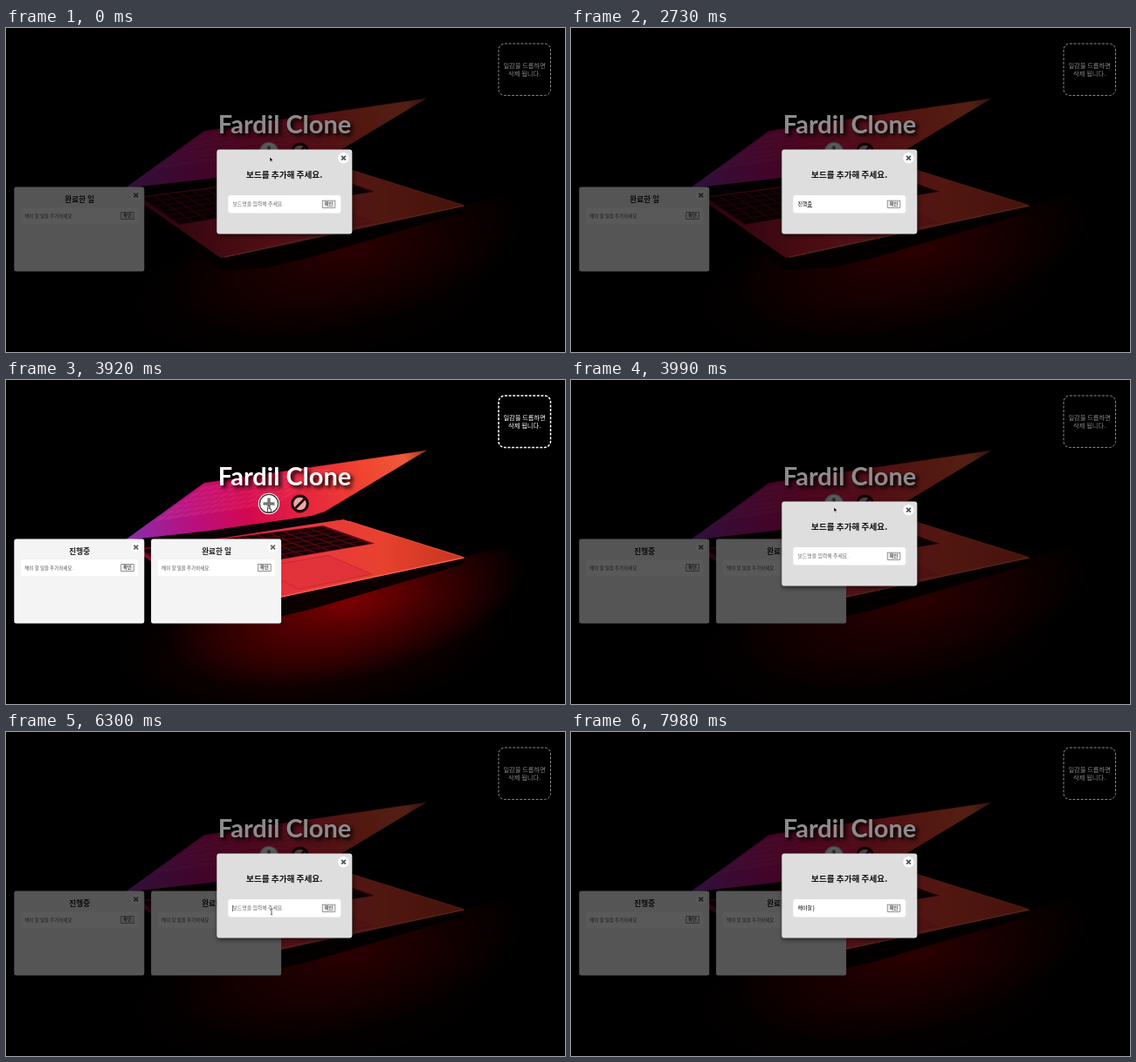
An HTML page with a canvas that plays this animation: 640 px wide and 372 px high, repeating every 8 s.

```html
<!DOCTYPE html>
<html lang="ko">
<head>
<meta charset="utf-8">
<title>Board</title>
<style>
  html, body { margin: 0; width: 100%; height: 100%; overflow: hidden; background: #000; }
  canvas { display: block; width: 640px; height: 372px; }
</style>
</head>
<body>
<canvas id="stage" width="640" height="372"></canvas>
<script>
const W = 640, H = 372, LOOP = 8000, STEP = 70;
const KR = '"Noto Sans CJK KR", "Noto Sans CJK", sans-serif';
const stage = document.getElementById('stage').getContext('2d');
let g = stage;

function poly(points, fill) {
  g.beginPath();
  points.forEach(([x, y], i) => i ? g.lineTo(x, y) : g.moveTo(x, y));
  g.closePath();
  g.fillStyle = fill;
  g.fill();
}

function box(x, y, w, h, r, fill) {
  g.beginPath();
  g.roundRect(x, y, w, h, r);
  g.fillStyle = fill;
  g.fill();
}

function disc(x, y, r, fill) {
  g.beginPath();
  g.arc(x, y, r, 0, Math.PI * 2);
  g.fillStyle = fill;
  g.fill();
}

function line(x1, y1, x2, y2, color, width) {
  g.beginPath();
  g.moveTo(x1, y1);
  g.lineTo(x2, y2);
  g.strokeStyle = color;
  g.lineWidth = width;
  g.stroke();
}

function text(s, x, y, size, color, align = 'left', weight = 400, family = KR) {
  g.font = `${weight} ${size}px ${family}`;
  g.textAlign = align;
  g.fillStyle = color;
  g.fillText(s, x, y);
}

function shadow(color, blur, dx, dy, draw) {
  g.save();
  g.shadowColor = color;
  g.shadowBlur = blur;
  g.shadowOffsetX = dx;
  g.shadowOffsetY = dy;
  draw();
  g.restore();
}

function ramp(x1, y1, x2, y2, ...stops) {
  const grad = g.createLinearGradient(x1, y1, x2, y2);
  stops.forEach(([p, c]) => grad.addColorStop(p, c));
  return grad;
}

function glow(x, y, rx, ry, angle, color, alpha) {
  g.save();
  g.translate(x, y);
  g.rotate(angle);
  g.scale(rx, ry);
  const grad = g.createRadialGradient(0, 0, 0, 0, 0, 1);
  grad.addColorStop(0, `rgba(${color},${alpha})`);
  grad.addColorStop(0.5, `rgba(${color},${alpha * 0.45})`);
  grad.addColorStop(1, `rgba(${color},0)`);
  g.fillStyle = grad;
  g.fillRect(-1, -1, 2, 2);
  g.restore();
}

// Maps unit coordinates onto a four-cornered surface.
const surface = (a, b, c, d) => (u, v) => [0, 1].map(i =>
  (a[i] * (1 - u) + b[i] * u) * (1 - v) + (d[i] * (1 - u) + c[i] * u) * v);

const patch = (at, u1, v1, u2, v2) => [at(u1, v1), at(u2, v1), at(u2, v2), at(u1, v2)];

function keys(at, u1, v1, u2, v2, fill) {
  const cols = 14, rows = 6, du = (u2 - u1) / cols, dv = (v2 - v1) / rows;
  for (let r = 0; r < rows; r++)
    for (let c = 0; c < cols; c++) {
      const u = u1 + c * du, v = v1 + r * dv;
      poly(patch(at, u, v, u + du * 0.86, v + dv * 0.84), fill);
    }
}

function paintPhoto() {
  g.fillStyle = '#000';
  g.fillRect(0, 0, W, H);
  glow(390, 258, 210, 85, -0.22, '145,0,2', 0.95);
  glow(350, 300, 230, 90, -0.1, '75,0,0', 0.5);
  // nothing is lit behind the machine
  poly([[0, 0], [W, 0], [W, 170], [526, 203], [386, 160], [140, 190], [0, 200]], '#000');

  const base = surface([140, 190], [386, 160], [526, 204], [246, 264]);
  poly([[140, 190], [246, 264], [526, 204], [522, 212], [350, 263], [300, 275], [244, 278]], '#0c0001');
  poly(patch(base, 0, 0, 1, 1),
    ramp(150, 210, 520, 200, [0, '#6e0a2c'], [0.3, '#cf1f34'], [0.5, '#ea3540'],
      [0.75, '#e8412f'], [1, '#c93620']));
  poly(patch(base, 0.02, 0.07, 0.87, 0.5), '#5a0a12');
  keys(base, 0.03, 0.08, 0.86, 0.5, '#180205');
  const pad = patch(base, 0.34, 0.56, 0.64, 0.95);
  poly(pad, '#e2323a');
  g.strokeStyle = '#b02428';
  g.lineWidth = 0.6;
  g.stroke();
  line(250, 263, 524, 204, '#f4604a', 1.6);
  line(392, 162, 522, 203, '#ee5a3c', 0.8);

  const lid = surface([227, 118], [482, 80.5], [365, 151], [136, 184]);
  poly([[136, 184], [365, 151], [386, 160], [250, 181], [150, 194]], '#0a0104');
  const face = [...patch(lid, 0, 0, 1, 1)];
  face.splice(3, 0, [350, 156], [233, 173]);
  poly(face,
    ramp(145, 180, 475, 90, [0, '#8a2ca6'], [0.2, '#b80f80'], [0.4, '#d4084f'],
      [0.58, '#e62440'], [0.8, '#f0442f'], [0.95, '#ee5a3a'], [1, '#b04030']));
  keys(lid, 0.02, 0.08, 0.62, 0.7, 'rgba(255,120,160,0.14)');
  line(227, 118, 482, 80.5, 'rgba(70,0,15,0.6)', 0.8);
}

const photo = document.createElement('canvas');
photo.width = W;
photo.height = H;
g = photo.getContext('2d');
paintPhoto();
g = stage;

function cross(x, y, color) {
  line(x - 2.4, y - 2.4, x + 2.4, y + 2.4, color, 1.8);
  line(x + 2.4, y - 2.4, x - 2.4, y + 2.4, color, 1.8);
}

function confirmButton(x, y) {
  box(x, y, 15.5, 9, 1, '#777');
  box(x + 0.7, y + 0.7, 14.1, 7.6, 0.6, '#eee');
  text('확인', x + 7.75, y + 6.4, 5.2, '#000', 'center');
}

function card(x, title) {
  box(x, 182.5, 149, 97, 2.5, '#f4f4f4');
  disc(x + 139.5, 192, 6, '#fff');
  cross(x + 139.5, 192, '#666');
  text(title, x + 75, 199.6, 8.7, '#222', 'center', 700);
  box(x + 8, 206, 134, 19, 3, '#fff');
  text('해야 할 일을 추가하세요.', x + 12, 217.5, 5.5, '#555');
  confirmButton(x + 122, 211);
}

function roundButtons(hover) {
  disc(301, 142, hover ? 12.2 : 11, hover ? '#fff' : '#c9c9c9');
  if (hover) disc(301, 142, 11.2, '#333');
  disc(301, 142, 10, '#fff');
  line(294.5, 142, 307.5, 142, '#777', 3.4);
  line(301, 135.5, 301, 148.5, '#777', 3.4);

  disc(336.5, 142, 10.4, '#1a0708');
  disc(336.5, 142, 7.3, '#eea9a6');
  line(331.3, 147.2, 341.7, 136.8, '#1a0708', 2.8);
}

function heading(color) {
  shadow('#000', 4, 3, 3, () =>
    text('Fardil Clone', 319, 121, 29, color, 'center', 700, 'Lato, sans-serif'));
}

function dropZone(color, width) {
  g.beginPath();
  g.roundRect(564, 18, 59.5, 59.4, 7);
  g.setLineDash([3, 1.6]);
  g.strokeStyle = color;
  g.lineWidth = width;
  g.stroke();
  g.setLineDash([]);
  text('일감을 드롭하면', 593.7, 45.7, 7.3, color, 'center', 500);
  text('삭제 됩니다.', 593.7, 55.4, 7.3, color, 'center', 500);
}

function page(boards, dimmed, hover) {
  g.drawImage(photo, 0, 0);
  roundButtons(hover);
  boards.forEach((title, i) => card(9.3 + i * 156.8, title));
  if (dimmed) {
    g.fillStyle = 'rgba(0,0,0,0.65)';
    g.fillRect(0, 0, W, H);
  }
  heading(dimmed ? '#8c8c8c' : '#fff');
  dropZone(dimmed ? '#8a8a8a' : '#fff', dimmed ? 1 : 1.5);
}

function modal({ value, composing, caret }) {
  shadow('rgba(0,0,0,0.6)', 5, 1, 2, () => box(241.3, 139.6, 155, 97, 3, '#dedede'));
  disc(386.5, 149.3, 6.2, '#fff');
  cross(386.5, 149.3, '#555');
  text('보드를 추가해 주세요.', 318.7, 171.8, 9.65, '#111', 'center', 700);
  box(254.3, 192, 129, 20.5, 3, '#fff');
  confirmButton(361.8, 197.8);
  const x = 259.4;
  if (!value) text('보드명을 입력해 주세요.', x, 204.2, 5.9, '#666');
  else text(value, x, 204.2, 6.1, '#000');
  g.font = `400 6.1px ${KR}`;
  const end = x + g.measureText(value).width;
  if (composing) {
    const start = x + g.measureText(value.slice(0, -1)).width;
    line(start, 205.6, end, 205.6, '#000', 0.7);
  }
  if (caret) line(end + 0.2, 198.8, end + 0.2, 206, '#333', 0.7);
}

const cursors = {
  arrow(x, y) {
    const shape = [[0, 0], [0, 5.4], [1.3, 4.3], [2.2, 6.2], [3.1, 5.8], [2.3, 4], [3.9, 3.9]];
    poly(shape.map(([a, b]) => [x + a, y + b]), '#000');
    g.strokeStyle = 'rgba(255,255,255,0.85)';
    g.lineWidth = 0.6;
    g.stroke();
  },
  beam(x, y) {
    line(x, y - 3, x, y + 3, '#333', 0.8);
    line(x - 1.3, y - 3.2, x + 1.3, y - 3.2, '#333', 0.6);
    line(x - 1.3, y + 3.2, x + 1.3, y + 3.2, '#333', 0.6);
  },
  hand(x, y) {
    box(x - 2, y + 1.5, 5, 4.6, 1.5, '#111');
    box(x - 1.2, y - 1.6, 2, 5, 1, '#111');
    box(x - 1.3, y + 2.2, 3.6, 3.2, 1, '#fff');
    box(x - 0.7, y - 1, 1, 4.4, 0.5, '#fff');
  }
};

// [time, x, y]; the pointer eases between these stops.
const path = [
  [0, 302, 148], [70, 302, 149], [350, 298, 190], [490, 298, 190], [1050, 304, 206.5],
  [3010, 304, 206.5], [3640, 301, 146], [4060, 301, 146], [4760, 304, 206.5], [LOOP, 304, 206.5]
];

function pointerAt(t) {
  const i = Math.max(1, path.findIndex(p => p[0] > t));
  const [t0, x0, y0] = path[i - 1], [t1, x1, y1] = path[i];
  const k = (t - t0) / (t1 - t0), e = k * k * (3 - 2 * k);
  return [x0 + (x1 - x0) * e, y0 + (y1 - y0) * e];
}

const typing = [
  [0, ''], [1400, 'ㅈ'], [1890, '지'], [1960, '진'], [2100, '진ㅎ'], [2240, '진해'],
  [2380, '진행'], [2450, '진행주'], [2520, '진행중'], [2870, ''],
  [6930, 'ㅎ'], [7140, '해'], [7280, '해ㅇ'], [7420, '해야'],
  [7630, '해야ㅎ'], [7700, '해야하'], [7770, '해야할'], [7910, '해야할 ']
];
const blinks = [[1050, 1400], [4760, 5250], [5810, 6370], [6860, 6930], [7910, LOOP]];
const within = (t, a, b) => t >= a && t < b;

function draw(t) {
  const open = t < 2870 || t >= 3990;
  const [x, y] = pointerAt(t);
  const hover = !open && t > 3010 && y < 154;
  page(t < 2870 ? ['완료한 일'] : ['진행중', '완료한 일'], open, hover);
  if (open) {
    const value = typing.filter(([at]) => at <= t).pop()[1];
    modal({
      value,
      composing: value && !value.endsWith(' '),
      caret: blinks.some(([a, b]) => within(t, a, b))
    });
  }
  if (within(t, 1400, 3010) || t >= 6930) return;
  const kind = hover ? 'hand' : open && y > 192 ? 'beam' : 'arrow';
  cursors[kind](x, y);
}

function tick() {
  const t = performance.now() % LOOP;
  draw(Math.floor(t / STEP) * STEP);
  requestAnimationFrame(tick);
}
tick();
</script>
</body>
</html>
```
